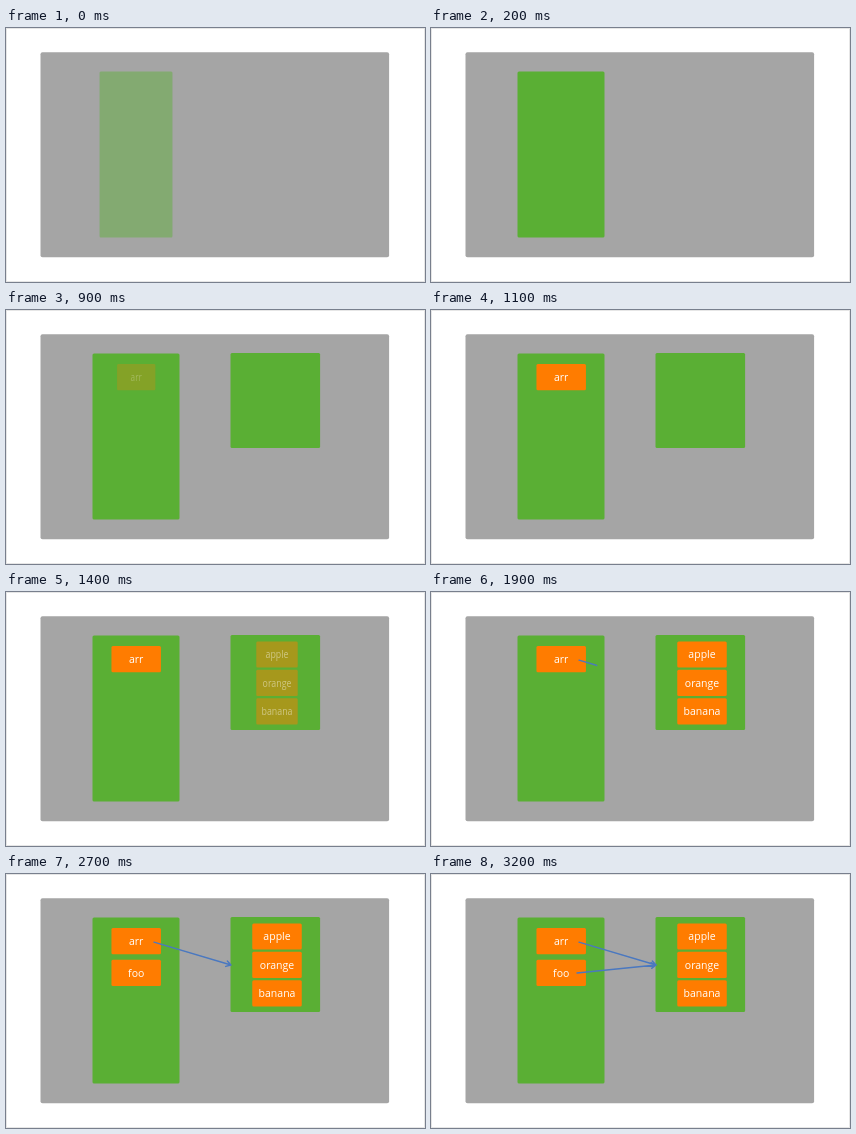
Write an HTML page with a canvas that moves like this. It is 419 px wide and 254 px high and loops after 3.3 s.

```html
<!DOCTYPE html>
<html lang="en">
<head>
<meta charset="utf-8">
<title>Array references</title>
<style>
html, body { margin: 0; width: 419px; height: 254px; overflow: hidden; background: #fff; }
canvas { display: block; }
</style>
</head>
<body>
<canvas id="stage" width="419" height="254"></canvas>
<script>
const ctx = document.getElementById('stage').getContext('2d');
const LOOP = 3300, STEP = 100;
const GREEN = '#5aaf34', ORANGE = '#ff7c00', BLUE = '#4a78c0';

const progress = (t, start, length) => Math.min(1, Math.max(0, (t - start) / length));

// A rounded box centred on (x, y), scaled about its centre, with an optional label.
function box(x, y, w, h, color, { label, sx = 1, sy = 1, alpha = 1, r = 1.5 } = {}) {
  if (!alpha) return;
  ctx.save();
  ctx.globalAlpha = alpha;
  ctx.translate(x, y);
  ctx.scale(sx, sy);
  ctx.fillStyle = color;
  ctx.beginPath();
  ctx.roundRect(-w / 2, -h / 2, w, h, r);
  ctx.fill();
  if (label) {
    ctx.fillStyle = '#fff';
    ctx.font = '10.5px "Open Sans", "Noto Sans", sans-serif';
    ctx.textAlign = 'center';
    ctx.fillText(label, 0, 3.8);
  }
  ctx.restore();
}

// Widens from 70 % while fading in.
const expand = (p, x, y, w, h, color, label) =>
  box(x, y, w, h, color, { label, sx: 0.7 + 0.3 * p, alpha: p });

// Grows from nothing while fading in.
const zoom = (p, x, y, w, h, color, label) =>
  box(x, y, w, h, color, { label, sx: p, sy: p, alpha: p });

// Arrow revealed from left to right.
function arrow(p, x1, y1, x2, y2) {
  if (!p) return;
  const angle = Math.atan2(y2 - y1, x2 - x1);
  ctx.save();
  ctx.beginPath();
  ctx.rect(x1 - 2, 0, (x2 - x1 + 4) * p, 254);
  ctx.clip();
  ctx.strokeStyle = BLUE;
  ctx.lineWidth = 1.4;
  ctx.lineCap = ctx.lineJoin = 'round';
  ctx.beginPath();
  ctx.moveTo(x1, y1);
  ctx.lineTo(x2, y2);
  for (const side of [-0.55, 0.55]) {
    ctx.moveTo(x2, y2);
    ctx.lineTo(x2 - 5.5 * Math.cos(angle + side), y2 - 5.5 * Math.sin(angle + side));
  }
  ctx.stroke();
  ctx.restore();
}

function draw(t) {
  ctx.fillStyle = '#fff';
  ctx.fillRect(0, 0, 419, 254);
  ctx.strokeStyle = '#e6e6e6';
  ctx.lineWidth = 1;
  ctx.strokeRect(0.5, 0.5, 418, 253);
  box(208.8, 126.8, 348.6, 205, '#a5a5a5', { r: 2 });

  expand(progress(t, -110, 240), 130, 126.4, 87, 166, GREEN);
  expand(progress(t, 390, 240), 269.3, 90.6, 89.6, 95, GREEN);
  expand(progress(t, 840, 240), 130.2, 67.2, 49.5, 26.2, ORANGE, 'arr');
  ['apple', 'orange', 'banana'].forEach((name, i) =>
    expand(progress(t, 1290, 240), 271, 62.5 + 28.4 * i, 49.5, 26.2, ORANGE, name));
  zoom(progress(t, 2300, 190), 130.2, 98.8, 49.5, 26.2, ORANGE, 'foo');
  arrow(progress(t, 1800, 400), 148, 68.2, 225, 91);
  arrow(progress(t, 2900, 300), 146, 99, 225, 91);
}

function frame() {
  const t = performance.now() % LOOP;
  draw(Math.floor(t / STEP) * STEP);
  requestAnimationFrame(frame);
}
frame();
</script>
</body>
</html>
```
